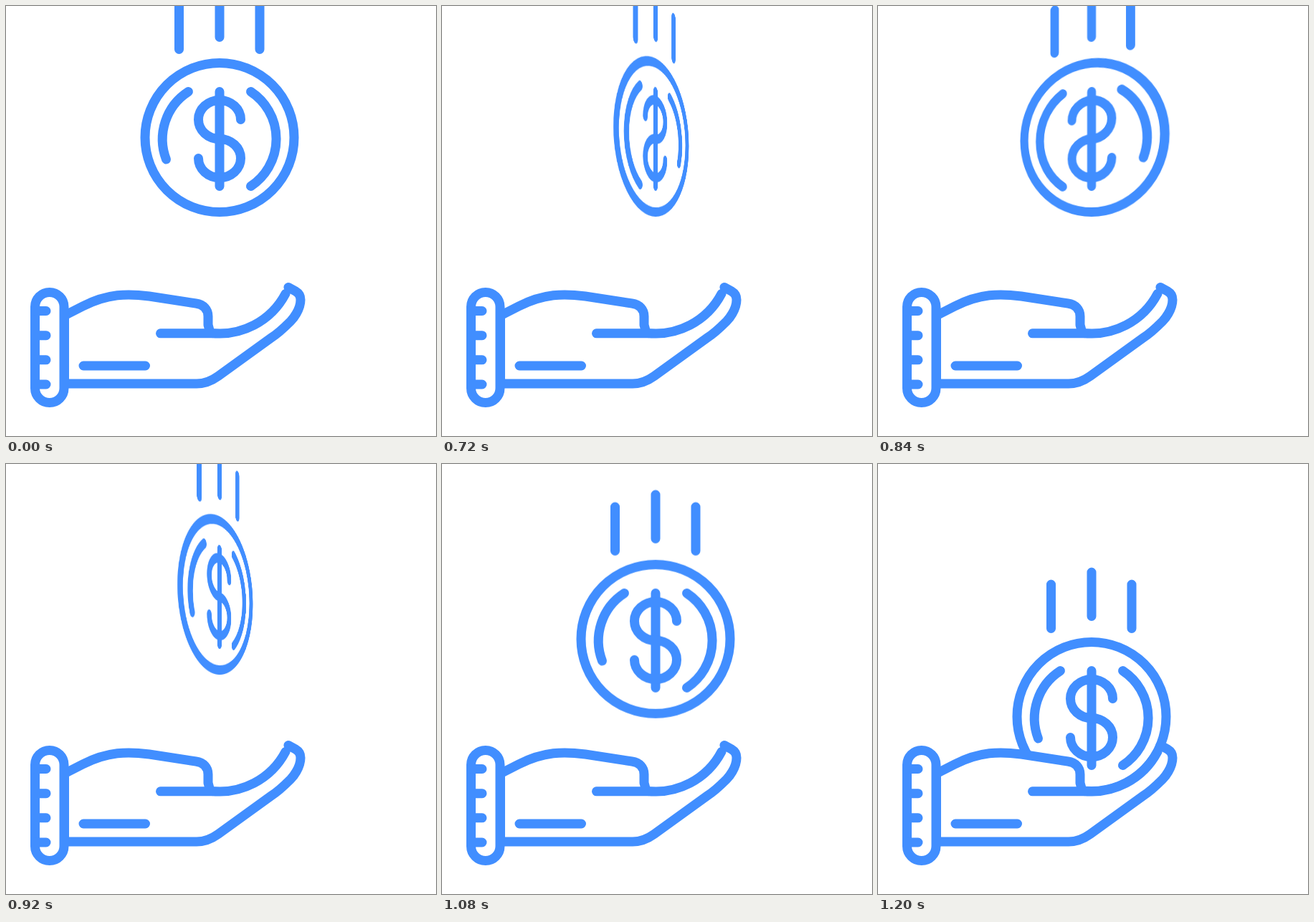
These frames come from a looping animation (600 px wide and 600 px high, 2 s). An HTML page without scripts:

```html
<!DOCTYPE html>
<html lang="en">
<head>
<meta charset="utf-8">
<title>Coin dropping into a hand</title>
<style>
  html, body {
    margin: 0;
    width: 100%;
    height: 100%;
    overflow: hidden;
    background: #fff;
  }
  .stage {
    position: relative;
    width: 600px;
    height: 600px;
    overflow: hidden;
  }
  .camera, .fall, svg {
    position: absolute;
    inset: 0;
    width: 600px;
    height: 600px;
  }
  .camera {
    perspective: 833.33px;
    perspective-origin: 300px 300px;
  }
  svg {
    overflow: visible;
    fill: none;
    stroke: #418eff;
    stroke-width: 13;
    stroke-linecap: round;
    stroke-linejoin: round;
  }
  .fall, .coin {
    animation: 2s cubic-bezier(.333, 0, .667, 1) infinite;
  }
  .fall {
    transform-style: preserve-3d;
    animation-name: fall;
  }
  .coin {
    transform-origin: 298px 183.5px;
    animation-name: spin;
  }
  @keyframes spin {
    0%, 30% { transform: rotateY(0deg); }
    40% { transform: rotateY(-180deg); }
    50%, 100% { transform: rotateY(-360deg); }
  }
  @keyframes fall {
    0%, 50% { transform: translateY(0); }
    60%, 100% { transform: translateY(169px); }
  }
</style>
</head>
<body>
<div class="stage">
  <div class="camera">
    <div class="fall">
      <svg class="coin" viewBox="0 0 600 600">
        <path d="M241.5-1V60.5M298-18V43.5M354-1V60.5"/>
        <circle cx="298" cy="183.5" r="104"/>
        <path d="M254.5 119.5A79 79 0 0 0 223.5 214M341.5 119.5A79 79 0 0 1 341.5 251.5"/>
        <path d="M298 119.5V251.5"/>
        <path d="M327.5 158.5A29.5 27 0 1 0 298 185.5A29.5 27 0 1 1 268.5 212.5"/>
      </svg>
    </div>
  </div>
  <svg class="hand" viewBox="0 0 600 600">
    <path fill="#fff" d="M394 392.5L404 398Q411 402 411 410C411 424 400 437 397 440C390 447 378 458 370 463L296 516.500C287 523 277 527 266 527H81.500V432L107 419C142 401 170 401 200 405L265 415C276 416.500 282 424 282 433V445L285 456.200A104 104 0 0 0 390 401.500"/>
    <path d="M215.500 456.800H288M108 502H194.500"/>
    <rect fill="#fff" x="40.500" y="399.500" width="40.500" height="154" rx="20.250"/>
    <path d="M40.500 425.500H56M40.500 459.700H56M40.500 493.800H56M40.500 528H56"/>
  </svg>
</div>
</body>
</html>
```
